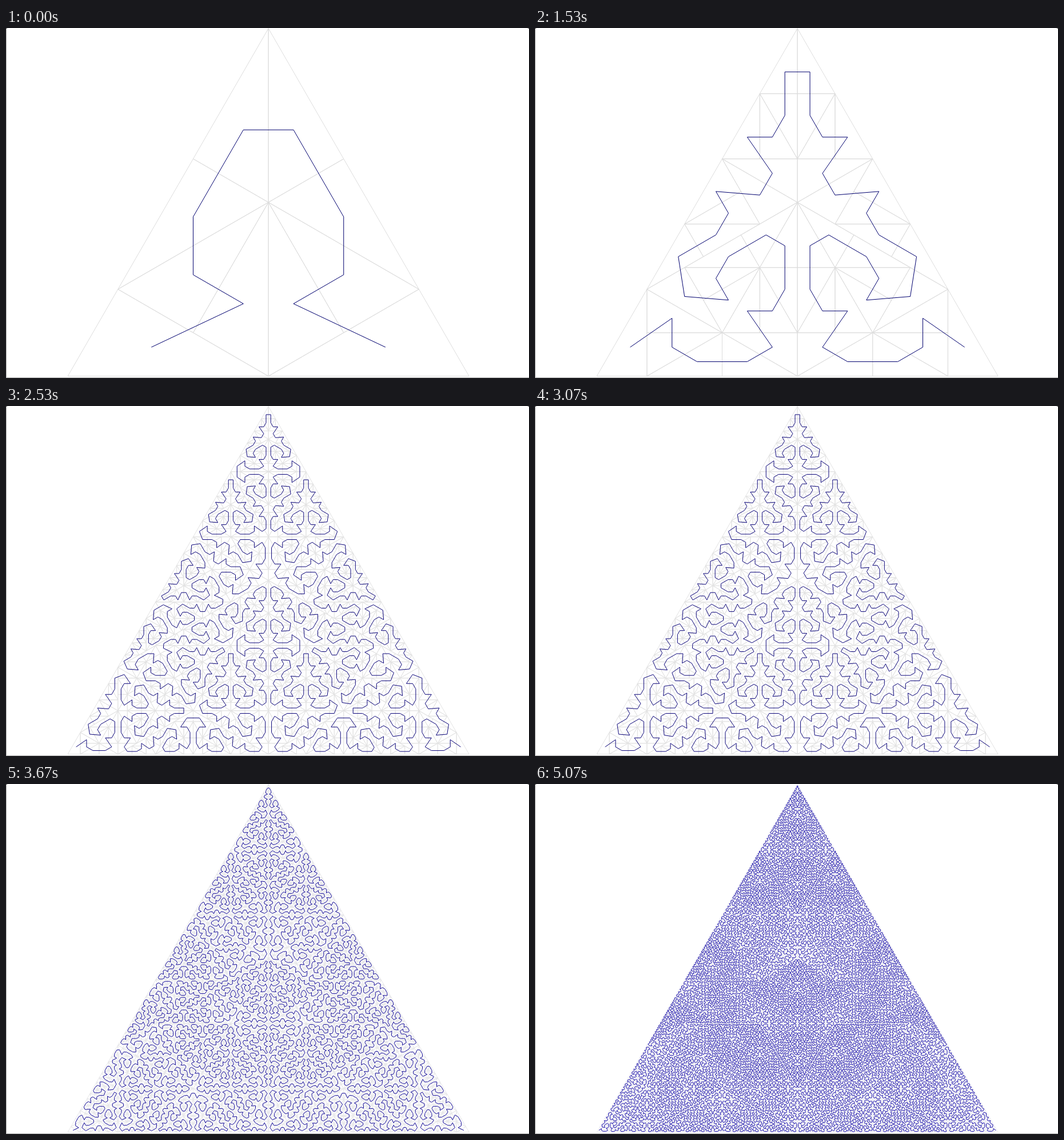
These frames come from a looping animation (915 px wide and 612 px high, 5140 ms). An HTML page with a canvas:

```html
<!DOCTYPE html>
<html lang="en">
<head>
<meta charset="utf-8">
<title>Space-filling curve on a triangle</title>
<style>
  html, body { margin: 0; width: 100%; height: 100%; overflow: hidden; background: #fff; }
  canvas { display: block; }
</style>
</head>
<body>
<canvas id="stage" width="915" height="612"></canvas>
<script>
const WIDTH = 915, HEIGHT = 612, LOOP = 5140;
const STARTS = [0, 1000, 1800, 2530, 3200, 3870];
const CURVE_COLORS = ['#00006e', '#00006e', '#00006e', '#0a0478', '#140c98', '#1a10ac'];
const GRID_COLORS = ['#ddd', '#ddd', '#e0e0e0', '#e3e3e3', '#e8e8ea', '#efeff4'];

const CENTER = 459.1, TOP = 0.8, TALL = 608, HALF = TALL / Math.sqrt(3);
const apex = [CENTER, TOP];
const foot = [CENTER, TOP + TALL];
const left = [CENTER - HALF, TOP + TALL];
const right = [CENTER + HALF, TOP + TALL];

const mix = (p, q, k) => [p[0] + (q[0] - p[0]) * k, p[1] + (q[1] - p[1]) * k];

// A 30-60-90 triangle: b is the 60° corner, a the 30° corner, m the right angle.
// Returns its descendants in the order in which the curve visits them, from b to a.
function subdivide([b, a, m], depth) {
  if (!depth) return [[b, a, m]];
  const p = mix(b, a, 1 / 4), c = mix(a, m, 1 / 2);
  const q = mix(p, m, 1 / 2), r = mix(a, p, 1 / 2);
  const forward = t => subdivide(t, depth - 1);
  const backward = t => forward(t).reverse();
  return [
    ...forward([b, m, p]),
    ...forward([m, c, q]),
    ...backward([p, c, q]),
    ...backward([c, p, r]),
    ...forward([c, a, r])
  ];
}

function renderLevel(level) {
  const layer = document.createElement('canvas');
  layer.width = WIDTH;
  layer.height = HEIGHT;
  const ctx = layer.getContext('2d');
  ctx.fillStyle = '#fff';
  ctx.fillRect(0, 0, WIDTH, HEIGHT);
  drawWindowEdge(ctx);

  const cells = [
    ...subdivide([left, apex, foot], level + 1),
    ...subdivide([right, apex, foot], level + 1).reverse()
  ];
  const grid = new Path2D(), curve = new Path2D();
  for (const [b, a, m] of cells) {
    grid.moveTo(...b);
    grid.lineTo(...a);
    grid.lineTo(...m);
    grid.closePath();
    curve.lineTo((b[0] + a[0] + m[0]) / 3, (b[1] + a[1] + m[1]) / 3);
  }
  ctx.lineJoin = 'bevel';
  ctx.strokeStyle = GRID_COLORS[level];
  ctx.stroke(grid);
  ctx.strokeStyle = CURVE_COLORS[level];
  ctx.stroke(curve);
  return layer;
}

function drawWindowEdge(ctx) {
  ctx.fillStyle = '#aaa';
  ctx.fillRect(0, 0, 1, HEIGHT);
  ctx.fillRect(0, HEIGHT - 1, WIDTH, 1);
  ctx.fillStyle = '#555';
  ctx.fillRect(0, 0, 2, 1);
  ctx.fillRect(WIDTH - 2, 0, 2, 1);
}

const stage = document.getElementById('stage').getContext('2d');
const layers = STARTS.map((_, level) => renderLevel(level));

function draw() {
  const time = performance.now() % LOOP;
  const level = STARTS.filter(start => start <= time).length - 1;
  stage.drawImage(layers[level], 0, 0);
  requestAnimationFrame(draw);
}
draw();
</script>
</body>
</html>
```
